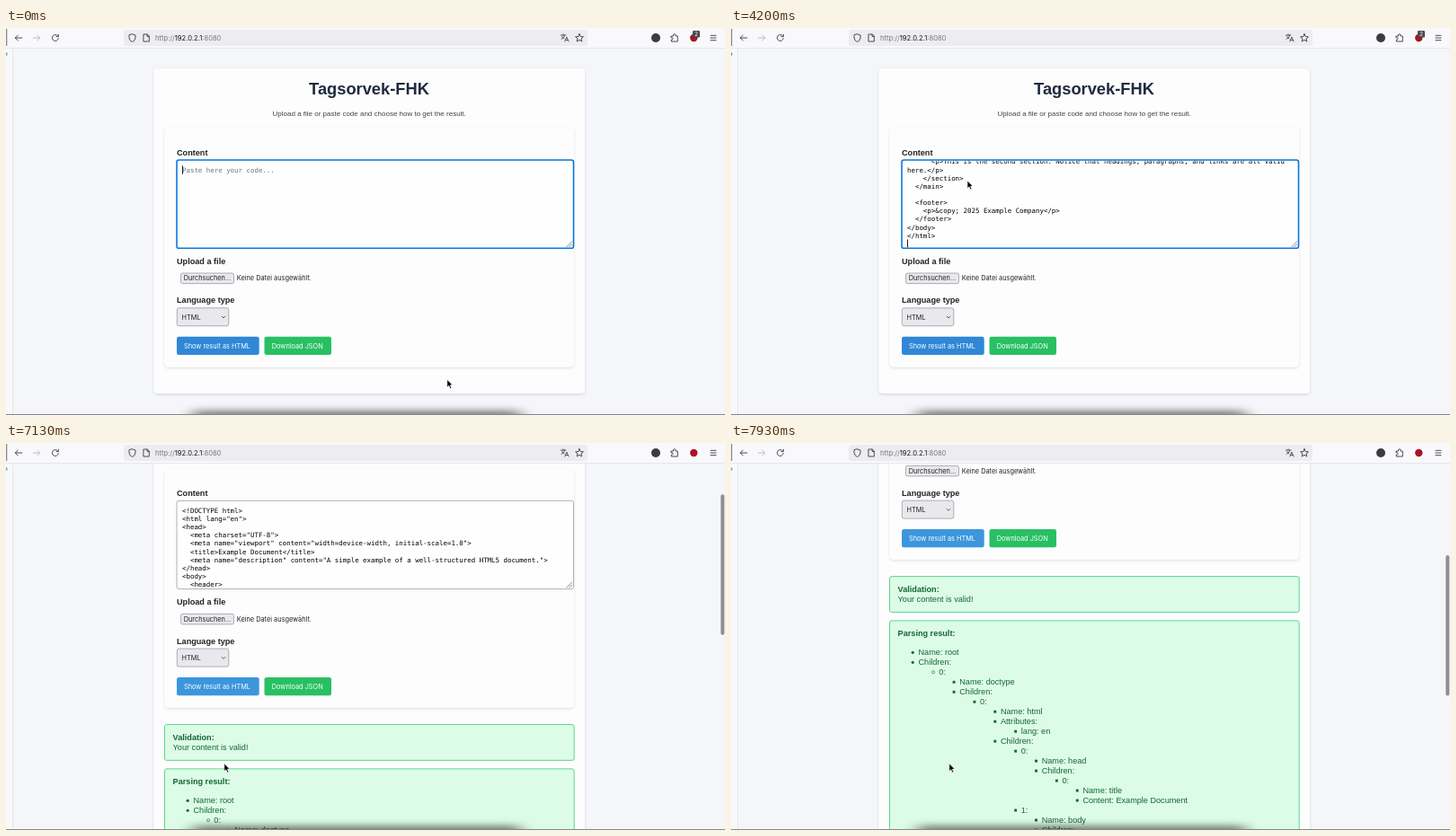
Write an HTML page that moves like this. It is 800 px wide and 431 px high and loops after 8000 ms.

```html
<!DOCTYPE html>
<html lang="en">
<head>
<meta charset="utf-8">
<title>Parser form</title>
<style>
  html, body { margin: 0; width: 100%; height: 100%; overflow: hidden; background: #f4f6f9; }
  svg { display: block; width: 100vw; height: 100vh; }
  text { white-space: pre; font: 9.14px "Liberation Sans", Arial, sans-serif; fill: #222; }
  .bold { font-weight: bold; }
  .title { font-size: 18.3px; font-weight: bold; fill: #1f2a3c; text-anchor: middle; }
  .lead { font-size: 8px; fill: #444; text-anchor: middle; }
  .ui { font: 7.35px Inter, sans-serif; }
  .button { font: 7.35px Inter, sans-serif; fill: #fff; }
  .url { font: 7.6px Inter, sans-serif; fill: #77777f; }
  .url tspan { fill: #15141a; }
  .code { font: 7.43px "DejaVu Sans Mono", monospace; fill: #000; }
  .hint { fill: #75757a; }
  .green, .green text { fill: #166534; }
  .icon { fill: none; stroke: #4a4a52; stroke-linecap: round; stroke-linejoin: round; }
  .control { fill: #e9e9ed; stroke: #8f8f9d; stroke-width: .7; }
  .result { fill: #dcfce7; stroke: #4ed182; stroke-width: .9; }
</style>
</head>
<body>
<svg viewBox="0 0 800 431" preserveAspectRatio="none">
  <defs>
    <filter id="soft" x="-10%" y="-10%" width="120%" height="120%">
      <feDropShadow dx="0" dy="1.2" stdDeviation="1.7" flood-opacity=".13"/>
    </filter>
    <filter id="blur" x="-20%" y="-400%" width="140%" height="900%">
      <feGaussianBlur stdDeviation="9 4.5"/>
    </filter>
    <clipPath id="box"><rect x="191" y="148.2" width="440" height="96.2"/></clipPath>
  </defs>

  <rect width="800" height="431" fill="#f4f6f9"/>
  <g id="page">
    <rect id="panel" x="164.5" y="45" width="479.5" height="362" rx="4.5" fill="#fdfdfe" filter="url(#soft)"/>
    <text class="title" x="404" y="73.6">Tagsorvek-FHK</text>
    <text class="lead" x="404.2" y="97.6">Upload a file or paste code and choose how to get the result.</text>
    <rect x="176.5" y="111" width="455.5" height="266.5" rx="4.5" fill="#fdfdfe" filter="url(#soft)"/>

    <text class="bold" x="190" y="141.6">Content</text>
    <rect id="area" x="190" y="147" width="441.5" height="98.3" rx="2.3" fill="#fefefe"/>
    <g clip-path="url(#box)">
      <text id="hint" class="code hint" x="196" y="160.6">Paste here your code...</text>
      <g id="head"></g>
      <g id="tail"></g>
    </g>
    <rect id="caret" x="196" width=".9" fill="#000"/>
    <path d="M623.5 244L630 237.5M626.5 244L630 240.5" stroke="#55555c" stroke-width=".7"/>

    <text class="bold" x="190" y="262.9">Upload a file</text>
    <rect class="control" x="194.5" y="273" width="59" height="11.6" rx="2"/>
    <text class="ui" x="197.7" y="281.4">Durchsuchen...</text>
    <text class="ui" x="256.8" y="281.4">Keine Datei ausgewählt.</text>

    <text class="bold" x="190" y="306.4">Language type</text>
    <rect class="control" x="190.3" y="311.8" width="57.5" height="20" rx="2.2"/>
    <text class="ui" x="195.6" y="324.7">HTML</text>
    <path class="icon" d="M240.2 321.2l1.8 1.8l1.8-1.8" stroke-width=".9"/>

    <rect id="show" x="190" y="343.7" width="91.7" height="20.3" rx="2.3"/>
    <text class="button" x="198" y="356.6">Show result as HTML</text>
    <rect x="287.5" y="343.7" width="74.5" height="20.3" rx="2.3" fill="#28c063"/>
    <text class="button" x="295.8" y="356.6">Download JSON</text>

    <g id="results" class="green">
      <rect class="result" x="176.5" y="396.3" width="455.7" height="39.8" rx="2.3"/>
      <text class="bold" x="185.6" y="413.8">Validation:</text>
      <text x="185.6" y="424.4">Your content is valid!</text>
      <rect class="result" x="176.5" y="445.6" width="455.7" height="600" rx="2.3"/>
      <text class="bold" x="185.6" y="463.1">Parsing result:</text>
      <g id="tree"></g>
    </g>
  </g>

  <rect id="thumb" x="795.3" width="4" height="156.5" rx="2" fill="#8e8e93"/>
  <rect y="22" width="7.5" height="409" fill="#f9f9fb"/>
  <rect x="7" y="22" width=".8" height="409" fill="#e0e2e6"/>
  <rect y="27.5" width="1.5" height="3" fill="#3fbf8f"/>

  <rect width="800" height="22.3" fill="#f9f9fb"/>
  <rect y="22" width="800" height=".7" fill="#e0e0e4"/>
  <rect y="1" width="1.3" height="19" fill="#8a8a92"/>
  <rect x="131" y="2" width="516" height="18" rx="2.5" fill="#ededf1"/>
  <text class="url" x="166" y="13.8">http://<tspan>192.0.2.1</tspan>:8080</text>
  <g class="icon" stroke-width="1">
    <path d="M17.8 11H10.3M13.3 8L10.3 11L13.3 14"/>
    <path d="M30.3 11H37.8M34.8 8L37.8 11L34.8 14" stroke="#bcbcc2"/>
    <path d="M57.6 8.8A3.5 3.5 0 1 0 58.3 11.6M58.4 7.2V9.6H56"/>
    <path d="M140.5 6.8L144 8V11Q143.8 14 140.5 15.5Q137.2 14 137 11V8Z"/>
    <path d="M153.3 7H157.2L159.3 9.2V15H153.3ZM157 7V9.4H159.3"/>
    <path d="M617.3 8H623M620 6.8V8M618 12.4Q621.4 11 621.8 8M618.5 9.5Q619.5 11.5 621 12M621.8 15L623.9 10L626 15M622.6 13.5H625.2" stroke-width=".9"/>
    <path d="M638 6.6L639.3 9.5L642.4 9.8L640 11.9L640.8 15L638 13.3L635.2 15L636 11.9L633.6 9.8L636.7 9.5Z"/>
    <path d="M740.3 9H742.5V8A1.3 1.3 0 0 1 745.1 8V9H747.3V15H740.3V13H741.3A1.2 1.2 0 0 0 741.3 10.7H740.3Z"/>
    <path d="M784 8.3H790M784 11H790M784 13.7H790"/>
  </g>
  <circle cx="723" cy="11" r="5" fill="#3b3b45"/>
  <circle cx="765.3" cy="11" r="4.2" fill="#a81422"/>
  <g id="badge">
    <rect x="764" y="3" width="8" height="7.5" rx="1.3" fill="#4a4a52"/>
    <text class="ui" x="768" y="9" style="fill:#fff;font-size:6px;text-anchor:middle">2</text>
  </g>

  <rect x="208" y="427" width="364" height="9" fill="#000" opacity=".6" filter="url(#blur)"/>
  <rect y="430" width="800" height="1" fill="#85858a"/>
  <path id="pointer" d="M0 0V8.6L2 6.8L3.4 10L4.9 9.4L3.5 6.3L6 6.1Z" fill="#000" stroke="#fff" stroke-width=".6"/>
</svg>

<script>
const $ = id => document.getElementById(id);
const LOOP = 8000, PASTE = 3530, LOAD = 5800, LINE = 9.14;

function put(parent, tag, attrs, content = '') {
  const el = document.createElementNS('http://www.w3.org/2000/svg', tag);
  for (const key in attrs) el.setAttribute(key, attrs[key]);
  el.textContent = content;
  parent.append(el);
}

function code(id, y, lines) {
  lines.split('\n').forEach((line, i) =>
    put($(id), 'text', { class: 'code', x: 196, y: y + i * LINE }, line));
}

code('head', 160.6, `<!DOCTYPE html>
<html lang="en">
<head>
  <meta charset="UTF-8">
  <meta name="viewport" content="width=device-width, initial-scale=1.0">
  <title>Example Document</title>
  <meta name="description" content="A simple example of a well-structured HTML5 document.">
</head>
<body>
  <header>`);
code('tail', 151.4, `      <p>This is the second section. Notice that headings, paragraphs, and links are all valid
here.</p>
    </section>
  </main>

  <footer>
    <p>&copy; 2025 Example Company</p>
  </footer>
</body>
</html>`);

// The leading digit is the nesting level.
const tree = `0Name: root|0Children:|10:|2Name: doctype|2Children:|30:|4Name: html|4Attributes:
5lang: en|4Children:|50:|6Name: head|6Children:|70:|8Name: title|8Content: Example Document
51:|6Name: body|6Children:`;
tree.split(/[|\n]/).forEach((item, i) => {
  const level = +item[0], x = 208.5 + level * 22.86, y = 480.8 + i * 10.98, g = $('tree');
  put(g, 'text', { x, y: y + 3 }, item.slice(1));
  if (level > 1) put(g, 'rect', { x: x - 7.6, y: y - 1.2, width: 2.9, height: 2.9 });
  else put(g, 'circle', {
    cx: x - 6.3, cy: y + .2, r: 1.6, stroke: '#166534',
    'stroke-width': level ? .6 : 0, 'fill-opacity': level ? 0 : 1
  });
});

const linear = u => u, smooth = u => u * u * (3 - 2 * u);

// Keys are [time, value, value...]
function track(keys, t, ease) {
  const i = keys.findIndex(k => k[0] > t);
  if (i < 0) return keys[keys.length - 1].slice(1);
  if (!i) return keys[0].slice(1);
  const a = keys[i - 1], b = keys[i], u = ease((t - a[0]) / (b[0] - a[0]));
  return a.slice(1).map((v, j) => v + (b[j + 1] - v) * u);
}

const pointerKeys = [[0, 490.8, 391.5], [2550, 490.8, 391.5], [3050, 263, 170], [4870, 263, 170],
  [5260, 244.8, 345], [5340, 244.8, 345], [5660, 242.8, 357]];
const scrollKeys = [[6750, 0], [6870, 5], [7130, 82.5], [7400, 139], [7600, 156], [7930, 247.7]];

const show = (id, on) => $(id).setAttribute('display', on ? 'inline' : 'none');
const set = (id, attrs) => { for (const k in attrs) $(id).setAttribute(k, attrs[k]); };

function draw(t) {
  const pasted = t >= PASTE, loaded = t >= LOAD;
  const [x, y] = track(pointerKeys, t, smooth);
  const [scroll] = track(scrollKeys, t, linear);
  set('pointer', { transform: `translate(${x} ${y})` });
  set('page', { transform: `translate(0 ${-scroll})` });
  set('thumb', { y: 23.3 + scroll * .411 });
  set('panel', { height: loaded ? 1100 : 362 });
  set('area', { stroke: loaded ? '#8f8f9d' : '#0a78dc', 'stroke-width': loaded ? .7 : 1.6 });
  set('show', { fill: loaded ? '#3b96dc' : '#2f87d6' });
  set('caret', pasted ? { y: 235.5, height: 8.8 } : { y: 153.3, height: 9.4 });
  show('caret', !loaded && (t + 470) % 1140 < 570);
  show('hint', !pasted);
  show('tail', pasted && !loaded);
  show('head', loaded);
  show('results', loaded);
  show('thumb', loaded);
  show('badge', !loaded);
}

const start = performance.now();
function tick() {
  draw((performance.now() - start) % LOOP);
  requestAnimationFrame(tick);
}
tick();
</script>
</body>
</html>
```
